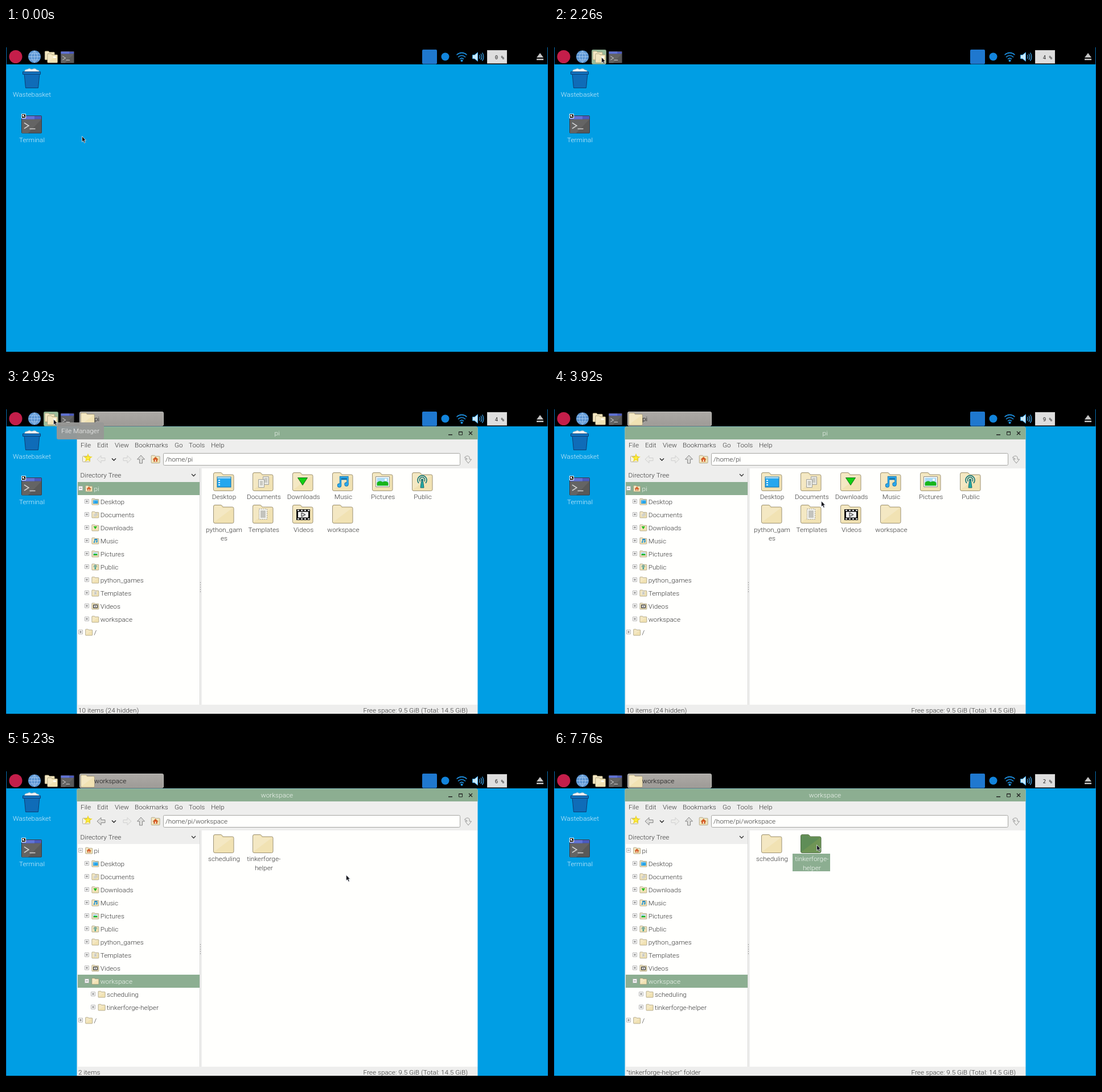
These frames come from a looping animation (952 by 588 pixels, 8 s). An HTML page with a canvas:

```html
<!DOCTYPE html>
<html lang="en">
<head>
<meta charset="utf-8">
<title>Desktop file manager</title>
<style>
  html, body { margin: 0; width: 100%; height: 100%; overflow: hidden; background: #000; }
  canvas { display: block; }
</style>
</head>
<body>
<canvas width="952" height="588"></canvas>
<script>
const ctx = document.querySelector('canvas').getContext('2d');
const LOOP = 8000;
const GREEN = '#8cae91', PANEL = '#eeeeed', PAPER = '#fffffd', INK = '#363636';

// time, x, y and ease-out power of the pointer
const pointerKeys = [
  [760, 133, 190, 1], [1260, 93, 95, 1], [1530, 84, 60, 1.2], [1760, 83, 51, 1.3],
  [3150, 83, 51, 1], [3920, 468, 195, 1], [3960, 488, 203, 1], [4230, 597, 216, 1.5],
  [5880, 597, 216, 1], [6460, 461, 163, 1.6]
];
const cpuLoad = [[0, 0], [1680, 4], [3230, 9], [4800, 6], [6280, 1], [7760, 2]];

function rect(x, y, w, h, fill) {
  ctx.fillStyle = fill;
  ctx.fillRect(x, y, w, h);
}
function round(x, y, w, h, r, fill, stroke) {
  ctx.beginPath();
  ctx.roundRect(x, y, w, h, r);
  if (fill) { ctx.fillStyle = fill; ctx.fill(); }
  if (stroke) { ctx.strokeStyle = stroke; ctx.lineWidth = 1; ctx.stroke(); }
}
function shape(d, fill, stroke, width = 1) {
  const path = new Path2D(d);
  if (fill) { ctx.fillStyle = fill; ctx.fill(path); }
  if (stroke) { ctx.strokeStyle = stroke; ctx.lineWidth = width; ctx.stroke(path); }
}
function disc(x, y, r, fill) {
  ctx.beginPath();
  ctx.arc(x, y, r, 0, 7);
  ctx.fillStyle = fill;
  ctx.fill();
}
function text(s, x, y, color = INK, align = 'left', font = '300 11.8px Roboto, sans-serif') {
  ctx.font = font;
  ctx.textAlign = align;
  ctx.fillStyle = color;
  ctx.fillText(s, x, y + 4.2);
}
function at(x, y, scale, draw) {
  ctx.save();
  ctx.translate(x, y);
  ctx.scale(scale, scale);
  draw();
  ctx.restore();
}

const emblems = {
  Desktop() {
    rect(6.5, 7.5, 25, 19, '#1670a8');
    rect(7.5, 8.5, 23, 17, '#25a7ee');
    rect(7.5, 8.5, 23, 2, '#c7e8fa');
    for (const y of [13, 17, 21]) rect(9, y, 3, 2, '#e2f4ff');
  },
  Documents() {
    shape('M18.5 7.5h10v14h-10z', '#e6e6e0', '#a0a09a');
    shape('M10.5 12.5h10v14h-10z', '#f0f0ea', '#a0a09a');
    rect(13, 15, 5, 8, '#c9c9c2');
    rect(21, 10, 5, 8, '#c9c9c2');
  },
  Downloads() { shape('M9.5 9.5H26.5L18 22.5z', '#12d012', '#17701a'); },
  Music() {
    shape('M14.5 23V8.5H27V21M14.5 11.5H27', null, '#1676ad', 3.4);
    disc(12.5, 23, 3.7, '#1676ad');
    disc(25, 21, 3.7, '#1676ad');
    shape('M14.5 23V9H27V21', null, '#2ba9ee', 2);
    disc(12.5, 23, 2.8, '#2ba9ee');
    disc(25, 21, 2.8, '#2ba9ee');
  },
  Pictures() {
    shape('M6.5 7.5h24v18h-24z', '#fff', '#8b8b86');
    rect(8.5, 9.5, 20, 14, '#a9daf5');
    shape('M8.5 23.5V18q5-5 10-1q5-3 10 1v5.5z', '#18b51c');
    disc(24, 13, 2, '#fff');
  },
  Public() {
    shape('M12 19a8 8 0 1 1 12 0M14.5 16a4.5 4.5 0 1 1 7 0', null, '#15787a', 1.7);
    disc(18, 13.5, 2.2, '#15787a');
    shape('M16.5 16h3l1.5 11h-6z', '#22aaa6', '#15696b');
  },
  Templates() {
    ctx.setLineDash([2, 1.5]);
    shape('M11.5 7.5h14v18h-14z', '#f6f6f0', '#999');
    ctx.setLineDash([]);
    rect(14, 10, 9, 13, '#c3c3bd');
  },
  Videos() {
    rect(7, 8, 24, 19, '#111');
    rect(10, 12.5, 18, 10, '#f4f4f4');
    for (let x = 9; x < 30; x += 6) {
      rect(x, 9, 3, 2, '#fff');
      rect(x, 24, 3, 2, '#fff');
    }
    shape('M16 14l7 3.5l-7 3.5z', '#ddd', '#222');
  },
  home() {
    shape('M18 7L7 17h4v9h14v-9h4z', '#d9591f', '#9a3a12');
    rect(16, 18, 4, 8, '#fff');
  }
};

function folder(x, y, scale, kind, selected) {
  at(x, y, scale, () => {
    const body = 'M.5 3q0-2.5 2.5-2.5h10q2 0 3 2l1 1.5h16.5q2.5 0 2.5 2.5v23.5q0 2.500-2.500 2.500h-30.500q-2.500 0-2.500-2.500z';
    shape(body, selected ? '#6f9555' : '#f1e2b3');
    shape('M1 31V4l2-2h10l3 4h18z', selected ? '#5f8d57' : '#f4e8c3');
    shape(body, null, selected ? '#45663e' : '#938a6d', Math.max(.9, .65 / scale));
    if (emblems[kind]) emblems[kind]();
  });
}

function terminal(x, y, scale) {
  at(x, y, scale, () => {
    round(.5, .5, 35, 30.5, 1, '#595959', '#3b3b42');
    shape('M1 7h34L12 31H1z', '#646464');
    rect(1, 1, 34, 5.5, '#4a5ac0');
    rect(1, 1, 22, 5.5, '#6073d6');
    shape('M5 13l8 5l-8 5M14.5 23.5h10', null, '#d2d2d2', 1.5);
  });
}

function desktop() {
  rect(0, 64, 952, 506, '#009ee4');
  rect(0, 34, 1, 536, '#0870b4');
  rect(951, 34, 1, 536, '#0870b4');
  shape('M33 78q-1-5 4-5q4-3 8 0q7-3 9 1q5 0 4 4z', '#f5f5f5', '#b9c4cc');
  shape('M32 80h27l-2.500 25.500h-22z', '#0f6cb8', '#0b3f74');
  shape('M29.500 77h31v4.500h-31z', '#1273c0', '#0b3f74');
  text('Wastebasket', 45.5, 117, '#d3edfb', 'center');
  terminal(27, 154, 1);
  rect(27, 151, 8, 8, '#fff');
  rect(28, 152, 6, 6, '#000');
  shape('M29.500 156v-2.500h2.500M29.500 153.500l3 3', null, '#fff', 1.2);
  text('Terminal', 45.5, 197, '#d3edfb', 'center');
}

function topBar(t) {
  disc(17, 50.5, 11.5, '#c41e4a');

  disc(50, 50.5, 11, '#5a94d2');
  shape('M39.500 50.500h21M41 45h18M41 56h18M50 40v21M50 40q-11 10.500 0 21M50 40q11 10.500 0 21', null, '#a9cbf0', .9);

  if (t >= 1570 && t < 3230) round(66.5, 38.5, 25, 25, 2, '#9dbd9c', '#7f9d80');
  folder(68, 40.5, .48);
  folder(72.5, 45, .5);
  rect(83, 50, 5, 3, '#fffdf0');
  terminal(96, 41, .66);

  round(731, 38, 26, 25.5, 2, '#1f78cf');
  disc(771.5, 50.5, 7, '#1284dc');

  ctx.lineCap = 'round';
  shape('M792 47a12.500 12.500 0 0 1 17 0M794.500 51a8.500 8.500 0 0 1 12 0M797.500 54.500a4.500 4.500 0 0 1 6 0', null, '#1f97ec', 1.6);
  ctx.lineCap = 'butt';
  disc(800.5, 57.5, 2, '#1f97ec');

  shape('M819.500 47.500h3.500l5.500-4.500v15.500l-5.500-4.500h-3.500z', '#c9e8fb', '#3ba5ec');
  shape('M831.500 47.500q2 3 0 6.500M834 45.500q3.500 5 0 10.500M836.500 43.500q4.500 7 0 14.500', null, '#3ba5ec', 1.3);

  rect(845, 39, 35, 23.5, '#cfcfcf');
  rect(846, 40, 33, 22, '#dedede');
  const load = cpuLoad.filter(k => k[0] <= t).pop()[1];
  text(load + ' %', 875, 50.5, '#222', 'right', '9px "DejaVu Sans Mono", monospace');

  shape('M938 44l6 8h-12z', '#c4c4c4');
  rect(932, 54, 12, 2.5, '#c4c4c4');

  if (t >= 2460) {
    const fill = ctx.createLinearGradient(0, 38, 0, 64);
    fill.addColorStop(0, '#adaaa6');
    fill.addColorStop(1, '#9d9a96');
    round(129.5, 38.5, 147, 24.5, 2, fill, '#c2c2be');
    folder(131, 40, .68);
    text(t >= 5070 ? 'workspace' : 'pi', 155, 51, '#111');
  }
}

function arrow(x, y, angle, enabled) {
  ctx.save();
  ctx.translate(x, y);
  ctx.rotate(angle);
  shape('M-7 0L0-6.500V-2.500H7V2.500H0V6.500Z', enabled ? '#dededc' : '#ececea', enabled ? '#858585' : '#d0d0d0');
  ctx.restore();
}

function toolbar(path, canGoBack) {
  round(134.5, 116.5, 13, 10, 1, '#f7f3e2', '#b5ae98');
  at(144, 119.5, 1, () =>
    shape('M0-6L1.500-2L6-1.500L2.500 1L3 5L0 3L-4 5L-2.500 1L-6-1.500L-1.500-2z', '#ffee3a', '#efd82a', 1.4));
  arrow(167, 122, 0, canGoBack);
  shape('M186 120.500l3.500 3.500l3.500-3.500', null, '#222', 1.4);
  arrow(213, 122, Math.PI, false);
  arrow(237, 122, Math.PI / 2, true);
  folder(255, 115, .42, 'home');
  round(276.5, 111.5, 521, 21, 2, PAPER, '#a5a5a2');
  text(path, 280, 122);
  shape('M806 118q5-4 8 0v4h3.500l-5.500 7l-5.500-7h3.500q0-3-4-2z', '#ededeb', '#999');
}

function expander(x, y, open) {
  shape(`M${x - 3.5} ${y - 3.5}h7v7h-7z`, '#fafafa', '#b8b8b8');
  rect(x - 2, y - .5, 4, 1, '#777');
  if (!open) rect(x - .5, y - 2, 1, 4, '#777');
}

const homeFolders = ['Desktop', 'Documents', 'Downloads', 'Music', 'Pictures',
  'Public', 'python_games', 'Templates', 'Videos', 'workspace'];
const workFolders = ['scheduling', 'tinkerforge-helper'];

function tree(expanded) {
  const rows = [['pi', 0], ...homeFolders.map(n => [n, 1])];
  if (expanded) rows.push(...workFolders.map(n => [n, 2]));
  rows.push(['/', 0]);
  const current = expanded ? 'workspace' : 'pi';
  rows.forEach(([name, depth], i) => {
    const y = 174 + i * 23, x = 131 + depth * 11.2;
    if (name === current) rect(126, y - 12, 214, 23, GREEN);
    expander(Math.round(x), y - 1, name === 'pi' || name === current);
    folder(x + 8.5, y - 6, .34, name === 'pi' ? 'home' : name);
    text(name, x + 23.5, y, name === current ? '#f4f8f4' : INK);
  });
}

// Long names wrap onto a second line
const wrapped = {
  python_games: ['python_gam', 'es'],
  'tinkerforge-helper': ['tinkerforge-', 'helper']
};
function icons(names, selected) {
  names.forEach((name, i) => {
    const x = 381.5 + (i % 6) * 69.8, y = 145 + Math.floor(i / 6) * 57.3;
    const lines = wrapped[name] || [name];
    const on = name === selected;
    folder(Math.round(x - 18), Math.round(y), 1, name, on);
    if (on) rect(Math.round(x - 32), Math.round(y + 34), 66, 15.5 * lines.length, GREEN);
    lines.forEach((s, n) => text(s, x + 1.5, y + 43 + n * 15.5, on ? '#f4f8f4' : INK, 'center'));
  });
}

function windowButtons() {
  rect(777, 78, 7, 1.5, '#222');
  shape('M795.500 73.500h6v5.500h-6zM795 74h7', null, '#222');
  shape('M813 73l6 6M819 73l-6 6', null, '#222', 1.4);
}

function fileManager(t) {
  const inWork = t >= 5070;
  const framed = t >= 2460;
  round(124.5, 64.5, 704, framed ? 506 : 308, [3, 3, 0, 0], PANEL);
  if (framed) round(124.5, 64.5, 704, 22.5, [3, 3, 0, 0], GREEN);
  text(inWork ? 'workspace' : 'pi', 476, 76, framed ? '#f2f6f2' : '#999', 'center');
  windowButtons();
  if (t < 2500) return;

  [['File', 131], ['Edit', 160], ['View', 191], ['Bookmarks', 226], ['Go', 296], ['Tools', 321], ['Help', 360]]
    .forEach(([s, x]) => text(s, x, 97));
  toolbar(inWork ? '/home/pi/workspace' : '/home/pi', inWork);

  text('Directory Tree', 130.5, 150);
  shape('M326 148l3.500 3.500l3.500-3.500', null, '#333', 1.3);
  rect(126, 162, 214, 392, PAPER);
  rect(340, 138, 1, 416, '#d8d8d6');
  rect(344, 138, 484, 416, PAPER);
  for (let y = 338; y < 356; y += 4) rect(341, y, 1, 2, '#aaa');
  tree(t >= 5230);

  let status = '10 items (24 hidden)';
  if (t >= 7260) status = '"tinkerforge-helper" folder';
  else if (inWork) status = '2 items';
  else if (t >= 4800) status = '"workspace" folder';
  text(status, 127, 563.5);
  text('Free space: 9.5 GiB (Total: 14.5 GiB)', 811, 563.5, INK, 'right');

  if (!inWork) icons(homeFolders, t >= 4800 && 'workspace');
  else if (t >= 5150) icons(workFolders, t >= 7260 && 'tinkerforge-helper');
}

function tooltip(s, x, y, w) {
  round(x, y, w, 30, 3, 'rgba(152,152,150,.96)');
  text(s, x + w / 2, y + 15, '#f4f4f4', 'center');
}

function pointer(t) {
  let [x, y] = pointerKeys[0].slice(1);
  for (let i = 1; i < pointerKeys.length; i++) {
    const [t0, x0, y0] = pointerKeys[i - 1], [t1, x1, y1, power] = pointerKeys[i];
    if (t < t0) break;
    const u = 1 - (1 - Math.min(1, (t - t0) / (t1 - t0))) ** power;
    x = x0 + (x1 - x0) * u;
    y = y0 + (y1 - y0) * u;
  }
  at(Math.round(x), Math.round(y), 1, () =>
    shape('M.5 .5V10.500L2.800 8.500L4.500 12.300L6.300 11.500L4.700 7.800H7.500Z', '#16161c', '#e4e8ee', .8));
}

function frame(now) {
  const t = now % LOOP;
  rect(0, 0, 952, 588, '#000');
  desktop();
  topBar(t);
  if (t >= 2420) fileManager(t);
  rect(0, 570, 952, 18, '#000');
  if (t >= 2920 && t < 3190) tooltip('File Manager', 89, 57, 83);
  if (t >= 7000 && t < 7260) tooltip('tinkerforge-helper', 466, 169, 106);
  pointer(t);
  requestAnimationFrame(frame);
}
requestAnimationFrame(frame);
</script>
</body>
</html>
```
